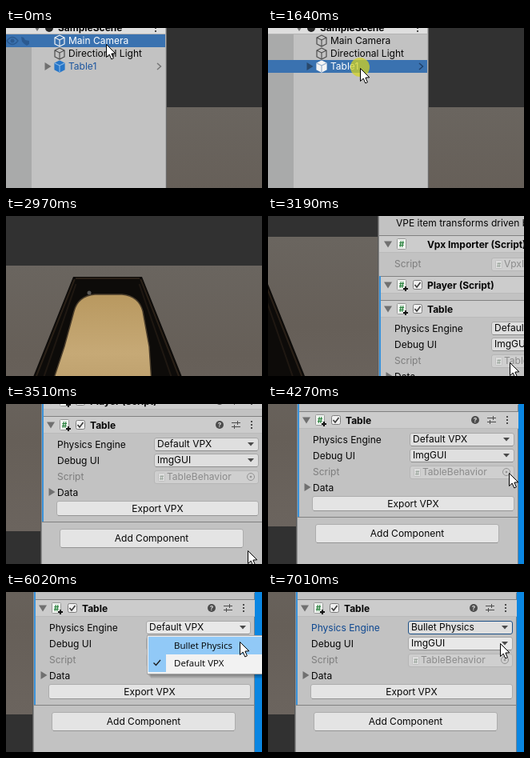
These frames come from a looping animation (320 px wide and 200 px high, 7460 ms). An HTML page with a canvas:

```html
<!DOCTYPE html>
<html lang="en">
<head>
<meta charset="utf-8">
<title>Choosing a physics engine</title>
<style>
html, body { margin: 0; width: 100%; height: 100%; overflow: hidden; background: #313131; }
canvas { display: block; width: 320px; height: 200px; }
</style>
</head>
<body>
<canvas id="stage" width="320" height="200"></canvas>
<script>
const g = document.getElementById('stage').getContext('2d', { alpha: false });
const LOOP = 7460;
const UI = 'Inter, "Liberation Sans", sans-serif';
const MENU = '"Open Sans", "Noto Sans", sans-serif';
const INK = '#060606', PANEL = '#c2c2c2', SELECT = '#3a72b0', ICON = '#4c4c4c', FOLD = '#707070';
const MARK = '#91c9f7';

const TICKS = [0, 200, 320, 430, 540, 660, 1640, 1860,
  2290, 2410, 2520, 2640, 2750, 2850, 2970, 3070, 3190, 3290, 3400, 3510, 3620, 3730,
  3960, 4070, 4170, 4270, 4390, 4490, 4600, 4720, 4830, 4940, 5370, 5480, 5590,
  6020, 6140, 6570, 6680, 6790, 6900, 7010];

const linear = u => u;
const easeIn = u => u * u;
const easeOut = u => 1 - (1 - u) ** 3;
const smooth = u => u * u * (3 - 2 * u);

// Moves: [start, end, x, y, easing]
const POINTER = [
  [0, 0, 126, 20, linear],
  [90, 660, 116, 50, smooth],
  [2180, 2750, 345, 115, easeIn],
  [2970, 3070, 303, 183, linear],
  [3850, 4270, 302, 86, smooth],
  [4270, 4600, 301, 49, smooth],
  [4600, 4940, 296, 49, smooth],
  [5910, 6020, 293, 62, linear],
  [6020, 6140, 291, 64, linear]
];
const CAMERA = [
  [0, 0, 0, 0, linear],
  [2520, 2750, 82, 0, easeIn],
  [2750, 3190, 459, 73, linear],
  [3190, 3730, 560, 169, easeOut],
  [3850, 4270, 561, 169, linear],
  [4270, 4600, 563, 169, linear]
];

function along(moves, t) {
  let [, , x, y] = moves[0];
  for (const [t0, t1, x1, y1, ease] of moves.slice(1)) {
    if (t <= t0) break;
    const k = ease(Math.min(1, (t - t0) / (t1 - t0)));
    x += (x1 - x) * k;
    y += (y1 - y) * k;
  }
  return { x: Math.round(x), y: Math.round(y) };
}

const within = (t, a, b) => t >= a && t < b;

function rect(x, y, w, h, color) {
  g.fillStyle = color;
  g.fillRect(x, y, w, h);
}

function text(str, x, y, color = INK, font = '12px ' + UI, align = 'left') {
  g.font = font;
  g.textAlign = align;
  g.fillStyle = color;
  g.fillText(str, x, y);
}

function trace(pts, close) {
  g.beginPath();
  for (let i = 0; i < pts.length; i += 2) g.lineTo(pts[i], pts[i + 1]);
  if (close) g.closePath();
}

function poly(pts, color) {
  trace(pts, true);
  g.fillStyle = color;
  g.fill();
}

function line(pts, color, width = 1) {
  trace(pts, false);
  g.strokeStyle = color;
  g.lineWidth = width;
  g.stroke();
}

function disc(x, y, r, color) {
  g.beginPath();
  g.arc(x, y, r, 0, 7);
  g.fillStyle = color;
  g.fill();
}

function ring(x, y, r, color, width = 1) {
  g.beginPath();
  g.arc(x, y, r, 0, 7);
  g.strokeStyle = color;
  g.lineWidth = width;
  g.stroke();
}

function box(x, y, w, h, fill, edge, r = 2.5) {
  g.beginPath();
  g.roundRect(x + .5, y + .5, w - 1, h - 1, r);
  g.fillStyle = fill;
  g.fill();
  g.strokeStyle = edge;
  g.lineWidth = 1;
  g.stroke();
}

const foldDown = (x, y) => poly([x - 5, y - 4, x + 5, y - 4, x, y + 4], FOLD);
const foldRight = (x, y, color = FOLD) => poly([x - 3.5, y - 5, x + 4.5, y, x - 3.5, y + 5], color);

function dots(x, y, color = ICON) {
  for (const d of [-4, 0, 4]) rect(x - 1, y + d - 1, 2, 2, color);
}

function cube(x, y, color, solid, seam) {
  const hex = [x, y - 7, x + 6, y - 4, x + 6, y + 4, x, y + 7, x - 6, y + 4, x - 6, y - 4];
  if (solid) poly(hex, color);
  line([...hex, x, y - 7], color, 1.2);
  line([x - 6, y - 4, x, y - 1, x + 6, y - 4], seam, 1.1);
  line([x, y - 1, x, y + 7], seam, 1.1);
}

function visibilityIcons(y, color) {
  g.beginPath();
  g.moveTo(1, y);
  g.quadraticCurveTo(8, y - 9, 15, y);
  g.quadraticCurveTo(8, y + 9, 1, y);
  g.strokeStyle = color;
  g.lineWidth = 1.3;
  g.stroke();
  disc(8, y, 2.5, color);
  poly([19, y - 5, 22, y - 4, 24, y - 1, 29, y, 29, y + 4, 26, y + 6, 23, y + 4, 20, y + 1], color);
}

function gameView() {
  rect(201, -400, 396, 1200, '#313131');
  g.save();
  g.beginPath();
  g.rect(201, 99, 396, 223);
  g.clip();
  const haze = g.createLinearGradient(0, 99, 0, 322);
  haze.addColorStop(0, '#6a655f');
  haze.addColorStop(.5, '#665f58');
  haze.addColorStop(1, '#6b645e');
  rect(201, 99, 396, 223, haze);

  // Table seen in perspective
  const mid = 398, half = y => 43 + .4 * (y - 113);
  poly([mid - half(113), 113, mid + half(113), 113, mid + half(322), 322, mid - half(322), 322], '#0d0b09');
  for (const s of [-1, 1]) {
    line([mid + s * (half(116) - 3), 116, mid + s * (half(322) - 4), 322], '#2a2017', 2);
    line([mid + s * (half(122) - 7), 122, mid + s * (half(322) - 18), 322], '#1f1812', 2);
  }
  line([358, 115, 438, 115], '#2a2017', 2);
  const wood = g.createLinearGradient(0, 133, 0, 322);
  wood.addColorStop(0, '#b8985f');
  wood.addColorStop(.4, '#c6a976');
  wood.addColorStop(1, '#ad8f5c');
  g.beginPath();
  g.moveTo(304, 322);
  g.lineTo(344, 200);
  g.lineTo(356, 156);
  g.quadraticCurveTo(361, 137, 382, 135);
  g.lineTo(416, 135);
  g.quadraticCurveTo(437, 137, 442, 156);
  g.lineTo(450, 200);
  g.lineTo(458, 322);
  g.closePath();
  g.fillStyle = wood;
  g.fill();
  g.strokeStyle = '#4a3d2b';
  g.lineWidth = 1.5;
  g.stroke();
  disc(375, 133, 2.5, '#5b5a58');
  g.restore();
}

function hierarchy(t, mouse) {
  rect(0, 0, 200, 200, PANEL);
  rect(0, 0, 32, 200, '#a9aaaa');
  rect(0, 0, 199, 7, '#dedede');
  rect(0, 7, 199, 1, '#b4b4b4');
  rect(199, 0, 1, 200, '#b0b0b0');
  rect(200, 0, 1, 200, '#6a6a6a');

  foldDown(39, 0);
  disc(54, 0, 5, '#222');
  text('SampleScene', 65, 4, INK, 'bold 12px ' + UI);
  dots(187, 0);

  const picked = t < 1640 ? 0 : 2;
  const hover = t < 2410 ? Math.floor((mouse.y - 8) / 16) : -1;
  rect(0, 8 + picked * 16, 199, 16, SELECT);

  ['Main Camera', 'Directional Light', 'Table1'].forEach((name, i) => {
    const y = 16 + i * 16, on = i === picked, prefab = i === 2;
    const plain = prefab ? '#1d569f' : INK;
    const tint = on ? '#f4f4f4' : prefab ? '#2776c8' : ICON;
    const seam = !prefab ? tint : on ? '#8fa9c6' : '#8fbbe6';
    cube(67, y, tint, prefab, seam);
    text(name, 78, y + 4, on ? '#fff' : plain);
    if (prefab) {
      foldRight(52, y, on ? '#29486b' : FOLD);
      const arrow = on ? '#1f4068' : i === hover ? '#454545' : '#747474';
      line([189, y - 4, 193.5, y, 189, y + 4], arrow, 1.4);
    }
    if (i === hover && !within(t, 1640, 1860)) visibilityIcons(y, on ? '#2b5a90' : '#7c7c7c');
  });
}

function scriptIcon(y, added) {
  box(57, y - 7, 12, 14, '#f1f5f1', '#9a9a9a', 1);
  text('#', 63, y + 4, '#25803a', 'bold 10px ' + UI, 'center');
  if (added) {
    rect(65, y + 4, 6, 2, '#111');
    rect(67, y + 2, 2, 6, '#111');
  }
}

function component(name, y, added) {
  rect(35, y - 10, 276, 20, '#cccccc');
  rect(35, y - 11, 276, 1, '#818181');
  rect(35, y + 10, 276, 1, '#bababa');
  foldDown(46, y + .5);
  scriptIcon(y, added);
  if (added) {
    box(77, y - 6, 12, 12, '#f0f0f0', '#7d7d7d', 2);
    line([79.5, y, 82, y + 3, 86.5, y - 3], '#3a3a3a', 1.6);
  }
  text(name, 95, y + 5, INK, 'bold 12px ' + UI);
  disc(257, y, 5, ICON);
  text('?', 257, y + 3, '#e4e4e4', 'bold 8px ' + UI, 'center');
  rect(272, y - 3, 11, 1, ICON);
  rect(272, y + 2, 11, 1, ICON);
  rect(279, y - 5, 1, 5, ICON);
  rect(275, y, 1, 5, ICON);
  dots(297, y);
}

function dropdown(value, y, hover, focus) {
  box(175, y - 8, 131, 17, hover ? '#e8e8e8' : '#dfdfdf', focus ? '#1c4f85' : '#a8a8a8');
  if (!focus) rect(177, y + 8, 127, 1, '#8e8e8e');
  text(value, 179, y + 4);
  poly([292, y - 2, 300, y - 2, 296, y + 2.5], '#4a4a4a');
}

function scriptField(name, y) {
  text('Script', 54, y + 4, '#7d7d7d');
  box(175, y - 8, 131, 17, '#cfcfcf', '#b6b6b6');
  box(180, y - 5, 9, 11, '#dedede', '#c0c0c0', 1);
  text('#', 184.5, y + 4, '#9aa59c', 'bold 8px ' + UI, 'center');
  text(name, 191, y + 4, '#8b8b8b');
  ring(296, y, 4.5, '#939393');
  disc(296, y, 1.3, '#939393');
}

function button(label, x, y, w, h) {
  box(x, y, w, h, '#e4e4e4', '#adadad');
  rect(x + 2, y + h - 1, w - 4, 1, '#949494');
  text(label, x + w / 2, y + h / 2 + 4, INK, '12px ' + UI, 'center');
}

function inspector(t) {
  const chosen = t >= 6680;
  rect(33, -400, 1, 800, '#5c5c5c');
  rect(34, -400, 277, 800, PANEL);
  rect(34, -400, 1, 800, '#8d8d8d');
  rect(310, -400, 1, 800, '#75828e');
  rect(311, -400, 400, 800, '#0a86e2');

  text('VPE item transforms driven by the table', 56, -83);
  component('Vpx Importer (Script)', -61, false);
  scriptField('VpxImporter', -36);
  component('Player (Script)', -10, true);
  component('Table', 20, true);

  text('Physics Engine', 54, 49, chosen ? '#0d4790' : INK);
  dropdown(chosen ? 'Bullet Physics' : 'Default VPX', 44, within(t, 4720, 6680), chosen);
  text('Debug UI', 54, 69);
  dropdown('ImgGUI', 64, chosen, false);
  scriptField('TableBehavior', 85);
  foldRight(47, 104);
  text('Data', 54, 109);
  button('Export VPX', 53, 115, 253, 19);
  rect(35, 141, 276, 1, '#818181');
  button('Add Component', 57, 150, 230, 24);
  rect(35, -21, 2, 162, '#3b93da');
}

function popup(t) {
  for (let i = 5; i > 0; i--) rect(176 + i, 54 + i, 160, 49, 'rgba(0,0,0,.07)');
  rect(176, 54, 160, 49, '#a9a9a9');
  rect(177, 55, 160, 47, '#f2f2f2');
  if (t >= 6020) rect(178, 56, 160, 22, MARK);
  rect(178, 78, 22, 22, MARK);
  const font = '11.5px ' + MENU;
  text('Bullet Physics', 210, 71, '#000', font);
  text('Default VPX', 210, 93, '#000', font);
  line([184.5, 88.5, 187.5, 91.5, 193, 85], '#1c1c1c', 1.4);
}

function pointer({ x, y }) {
  g.save();
  g.translate(x - .5, y + .5);
  trace([0, 0, 0, 16, 3.7, 12.6, 6.3, 18.5, 8.9, 17.3, 6.4, 11.6, 11.3, 11.3], true);
  g.fillStyle = '#fff';
  g.fill();
  g.strokeStyle = '#000';
  g.lineWidth = 1;
  g.stroke();
  g.restore();
}

function draw(t) {
  const cam = along(CAMERA, t), mouse = along(POINTER, t);
  rect(0, 0, 320, 200, '#313131');
  g.save();
  g.translate(-cam.x, -cam.y);
  gameView();
  hierarchy(t, mouse);
  g.translate(563, 169);
  inspector(t);
  g.restore();
  if (within(t, 5480, 6680)) popup(t);
  if ([1640, 5370, 6570].some(c => within(t, c, c + 220))) {
    disc(mouse.x - 1, mouse.y - 1, 12, 'rgba(214,212,30,.72)');
  }
  pointer(mouse);
}

const start = performance.now();
let shown = -1;
function frame() {
  const now = (performance.now() - start) % LOOP;
  const t = TICKS.findLast(k => k <= now);
  if (t !== shown) draw(shown = t);
  requestAnimationFrame(frame);
}
frame();
</script>
</body>
</html>
```
